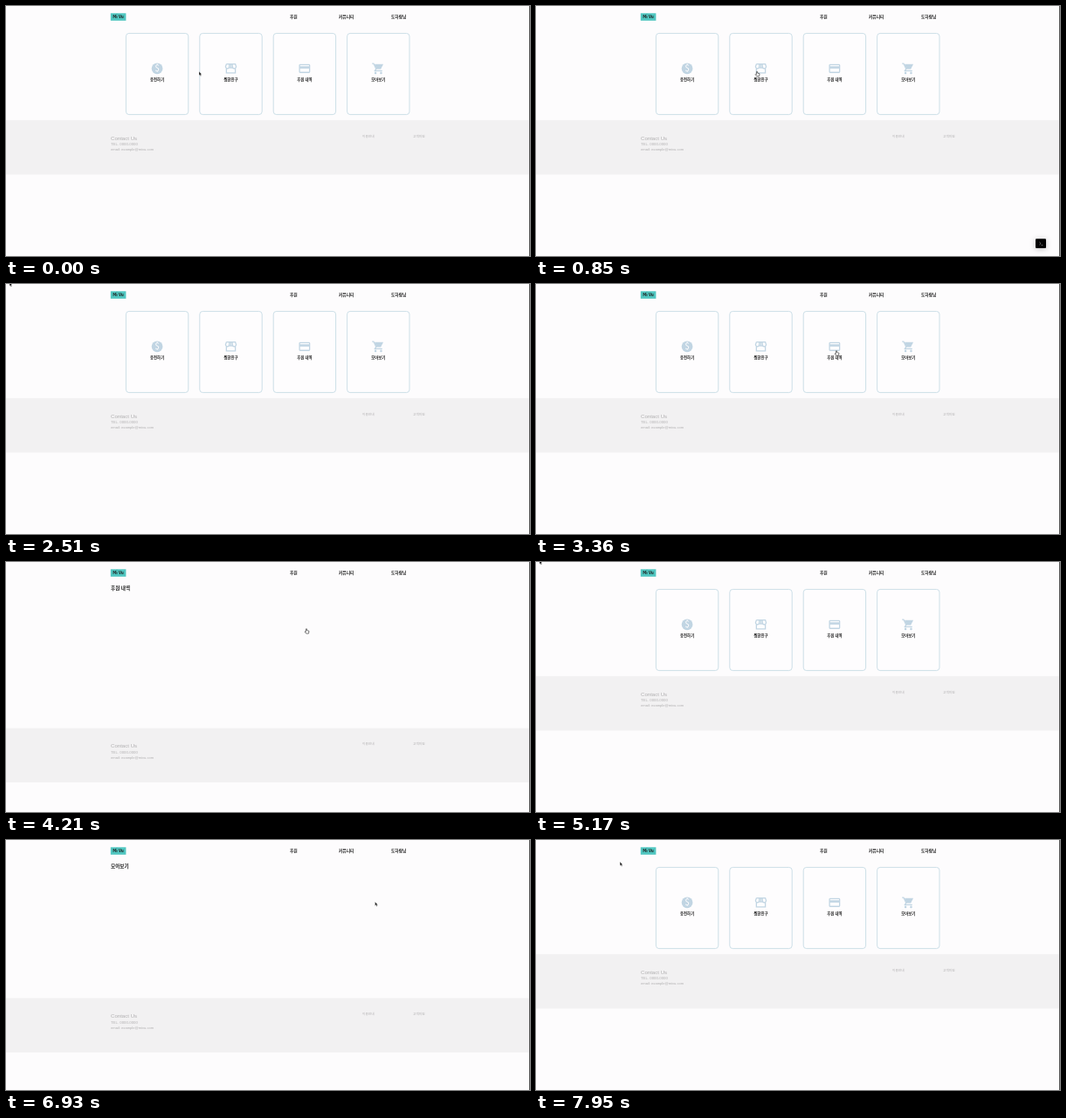
An HTML page that plays this animation: 600 px wide and 287 px high, repeating every 8 s.

```html
<!DOCTYPE html>
<html lang="ko">
<head>
<meta charset="utf-8">
<style>
  html, body { margin: 0; width: 100%; height: 100%; overflow: hidden; background: #fdfcfd; }
  svg { display: block; width: 100vw; height: 100vh; }
  text { font-family: "Noto Sans CJK KR", "Noto Sans CJK", sans-serif; fill: #1c1c1c; }
  .nav { font-size: 4.75px; font-weight: 700; }
  .title { font-size: 5.6px; font-weight: 700; }
  .note { font-size: 4.7px; font-weight: 500; }
  .label { font-size: 4.4px; font-weight: 700; text-anchor: middle; }
  .foot text { font-family: "Liberation Sans", "Noto Sans CJK KR", sans-serif; fill: #b0afb0; }
  .card { fill: #fefdfe; stroke: #b8d3de; stroke-width: .7; }
  .line { fill: none; stroke: #c1d5e3; stroke-width: 2; }
  .solid { fill: #c1d5e3; }
  .badge { filter: drop-shadow(0 1px 3px rgba(0, 0, 0, .25)); }
</style>
</head>
<body>
<svg viewBox="0 0 600 287" preserveAspectRatio="none">
  <rect width="600" height="287" fill="#fdfcfd"/>
  <rect x="119.8" y="8.3" width="17.6" height="8.5" fill="#50c6c0"/>
  <text class="nav" x="128.6" y="14.2" text-anchor="middle">Mi Vu</text>
  <text class="nav" x="325" y="14">후원</text>
  <text class="nav" x="381" y="14">커뮤니티</text>
  <text class="nav" x="441" y="14">도하람님</text>

  <g id="cards"></g>
  <text id="title" class="title" x="120" y="31.8"></text>
  <text id="note" class="note" x="120" y="39.8"></text>

  <g id="foot" class="foot">
    <rect width="600" height="62.3" fill="#f2f1f2"/>
    <text x="120" y="22.4" font-size="6.1">Contact Us</text>
    <text x="120" y="29" font-size="4.3">TEL. 0000-0000</text>
    <text x="120" y="35.3" font-size="4.1">email: example@mivu.com</text>
    <text x="408" y="19.7" font-size="3.7">이용안내</text>
    <text x="466" y="19.7" font-size="3.7">고객지원</text>
  </g>

  <g id="badge" class="badge">
    <rect x="572" y="267.3" width="12" height="10.8" rx="1"/>
    <path d="M576.4 271l1.6 1.6-1.6 1.6M578.6 274.6h1.8" fill="none" stroke="#ccc" stroke-width=".5"/>
  </g>
  <circle id="ring" r="5" fill="#fff" fill-opacity=".45" stroke="#b0a0a8" stroke-width=".8"/>

  <rect x="599" width="1" height="287" fill="#555"/>

  <g id="cursor">
    <path id="arrow" d="M0 0V4.4L1 3.5 1.8 5.2 2.6 4.8 1.8 3.3H3.2Z" fill="#111" stroke="#fff" stroke-width=".3"/>
    <path id="hand" d="M-.6 3.4V.6Q0-.3.6.6V2.3L3 3 2.5 5.8H-.3L-1.9 3.8Q-1.8 3-.6 3.8Z" fill="#fff" stroke="#222" stroke-width=".6"/>
  </g>
</svg>
<script>
const LOOP = 8000, GLIDE = 800, FADE = 100;
const CARD = { x: 137.4, y: 31.4, w: 71.4, h: 93.2, step: 84.4 };
const HOME = [4, -2];
const TOP = { dashboard: 131.2, loading: 190.7, empty: 42.2 };

const $ = id => document.getElementById(id);
const clamp = v => Math.max(0, Math.min(1, v));
const ease = (t, from, to) => {
  const v = clamp((t - from) / (to - from));
  return v * v * (3 - 2 * v);
};
const mix = (a, b, k) => a.map((v, i) => v + (b[i] - v) * k);
const show = (el, on) => el.setAttribute('visibility', on ? 'visible' : 'hidden');
const move = (el, x, y) => el.setAttribute('transform', `translate(${x} ${y})`);

// icons on a 24-unit grid
const ICONS = {
  '충전하기': `<circle class="solid" cx="12" cy="12" r="10"/>
    <text x="12" y="17.6" font-size="16" text-anchor="middle" style="fill:#fefdfe;font-weight:500">$</text>`,
  '찜한친구': `<path class="line" d="M4 12V20H20V12M4 4H20L21.5 9Q21 12 18 12T15 9L14.5 4M9.5 4L9 9Q9 12 6 12T2.5 9L4 4M12 4V9Q12 12 9 10M12 9Q12 12 15 10"/>`,
  '후원 내역': `<rect class="line" x="3" y="5" width="18" height="14" rx="1"/>
    <rect class="solid" x="3" y="8" width="18" height="4"/>`,
  '모아보기': `<path class="line" d="M1 3H3.6L8 12.5 6 16H19"/>
    <path class="solid" d="M5 4H21L16.5 13H8.5Z"/>
    <circle class="solid" cx="7" cy="20" r="2"/><circle class="solid" cx="17" cy="20" r="2"/>`
};
$('cards').innerHTML = Object.entries(ICONS).map(([label, icon], i) => `
  <g transform="translate(${CARD.x + i * CARD.step} ${CARD.y})">
    <rect class="card" width="${CARD.w}" height="${CARD.h}" rx="3.5"/>
    <g transform="translate(28 32.7) scale(.64)">${icon}</g>
    <text class="label" x="${CARD.w / 2}" y="54.4">${label}</text>
  </g>`).join('');

// Each visit: glide to a card, open its page, leave through the top, go back.
const VISITS = [
  { title: '찜한 친구들', note: '찜한 친구가 없습니다.', from: [221, 75.3], spot: [264.5, 74.6], exit: [57, -8],
    start: 320, open: 1170, loaded: 1330, leave: 1620, gone: 2130, back: 2510 },
  { title: '후원 내역', from: HOME, spot: [344, 76.3], exit: HOME,
    start: 2510, open: 4210, leave: 4310, gone: 4910, back: 5170 },
  { title: '모아보기', note: '모아보기가 없습니다.', from: HOME, spot: [428, 72.5], exit: [119, -8], top: 181.5,
    start: 5170, open: 6670, loaded: 7040, leave: 6920, gone: 7060, back: 7630 },
  { from: HOME, spot: [264.5, 74.6], start: 7630 }
];

function overCard([x, y]) {
  const dx = x - CARD.x;
  return dx > 0 && dx < 4 * CARD.step && dx % CARD.step < CARD.w && y > CARD.y && y < CARD.y + CARD.h;
}

function draw(t) {
  const v = VISITS.findLast(v => v.start <= t) || VISITS[0];
  const opened = t >= v.open, loaded = t >= v.loaded;
  show($('cards'), !opened);
  $('title').textContent = opened ? v.title : '';
  $('note').textContent = loaded ? v.note : '';
  move($('foot'), 0, loaded ? TOP.empty : opened ? v.top || TOP.loading : TOP.dashboard);

  const pos = t >= v.leave
    ? mix(v.spot, v.exit, ease(t, v.leave, v.gone))
    : mix(v.from, v.spot, ease(t, v.start, v.start + GLIDE));
  const pointing = overCard(pos) && !(t > v.open + FADE);
  move($('cursor'), ...pos);
  show($('arrow'), !pointing);
  show($('hand'), pointing);

  // the build badge shows between the click and the new page
  const on = v.open - 770, off = v.open - 215;
  const level = v.open ? Math.min(ease(t, on, on + FADE), 1 - ease(t, off - FADE, off)) : 0;
  $('badge').setAttribute('opacity', level);
  move($('badge'), 0, 5 * (1 - level));
  move($('ring'), ...pos);
  show($('ring'), t > on + FADE && t < on + 3 * FADE);
}

const start = performance.now();
function tick(now) {
  draw(Math.max(0, now - start) % LOOP);
  requestAnimationFrame(tick);
}
draw(0);
requestAnimationFrame(tick);
</script>
</body>
</html>
```
